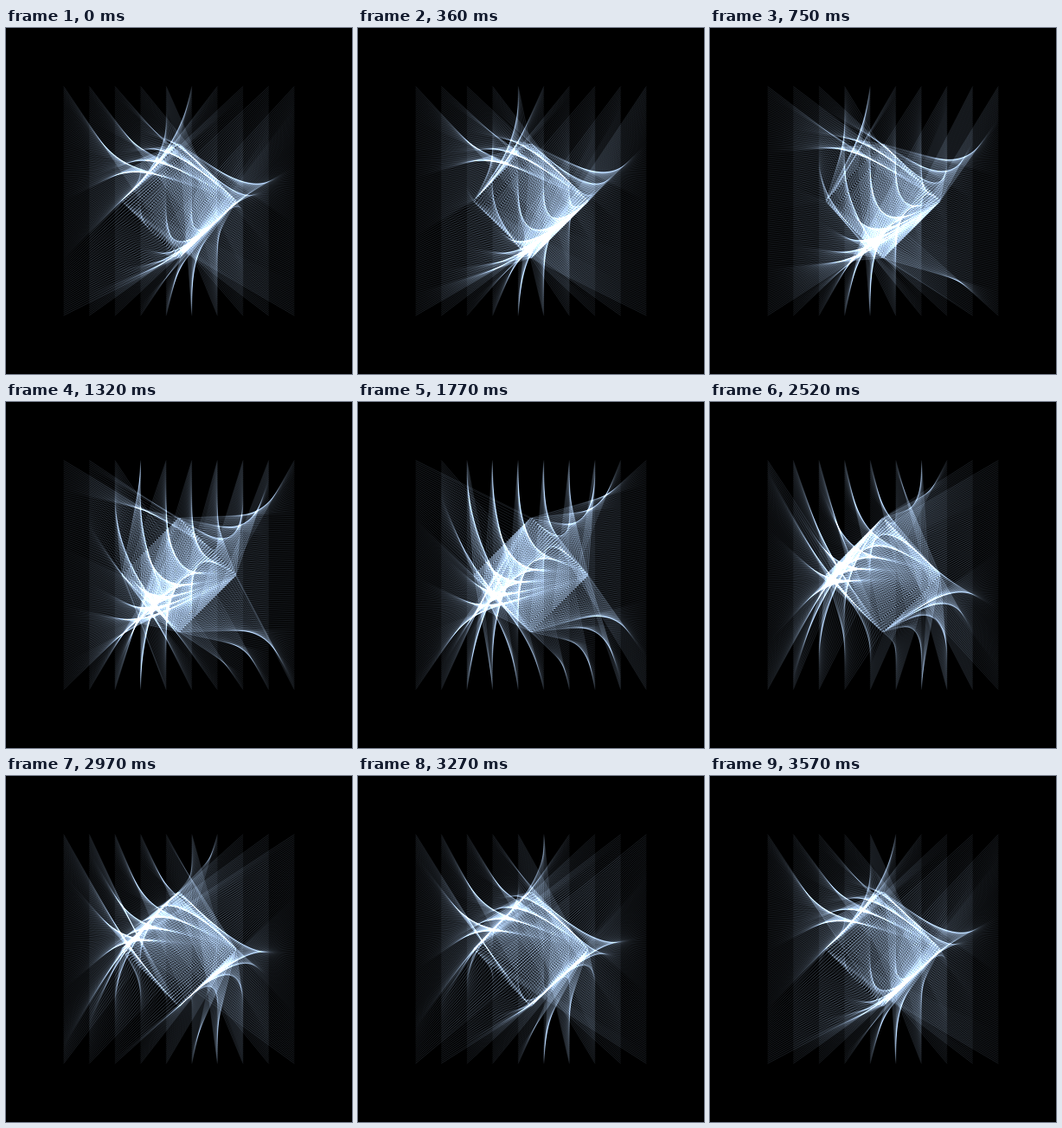
These frames come from a looping animation (400 px wide and 400 px high, 3.6 s). An HTML page with a canvas:

```html
<!DOCTYPE html>
<html>
<head>
<meta charset="utf-8">
<style>
html, body { margin: 0; width: 100%; height: 100%; overflow: hidden; background: #000; }
canvas { display: block; width: 400px; height: 400px; }
</style>
</head>
<body>
<canvas id="stage" width="400" height="400"></canvas>
<script>
const LOOP = 3600, STEP = 30;
const COLS = 10, ROWS = 120;
const HALF = 400 / 3, RADIUS = 200 / 3;
const PHASE = 0.75;     // the first thread starts at the bottom corner
const ctx = document.getElementById('stage').getContext('2d');

// Point on the diamond, counted in turns anticlockwise from the right corner.
function diamond(turn) {
  const wave = v => 4 * Math.abs(v - Math.floor(v) - 0.5) - 1;
  return [200 + RADIUS * wave(turn), 200 - RADIUS * wave(turn - 0.25)];
}

function draw(time) {
  const shift = PHASE + Math.floor(time % LOOP / STEP) * STEP / LOOP;
  ctx.globalCompositeOperation = 'source-over';
  ctx.fillStyle = '#000';
  ctx.fillRect(0, 0, 400, 400);
  ctx.globalCompositeOperation = 'lighter';
  ctx.strokeStyle = 'rgb(23,27,32)';
  ctx.lineWidth = 1;
  for (let col = 0; col < COLS; col++) {
    const x = 200 - HALF + 2 * HALF * col / (COLS - 1);
    for (let row = 0; row < ROWS; row++) {
      const u = (row + 0.5) / ROWS;
      ctx.beginPath();
      ctx.moveTo(x, 200 - HALF + 2 * HALF * u);
      ctx.lineTo(...diamond(shift + u + col / COLS));
      ctx.stroke();
    }
  }
}

const start = performance.now();
function tick() {
  draw(performance.now() - start);
  requestAnimationFrame(tick);
}
tick();
</script>
</body>
</html>
```
